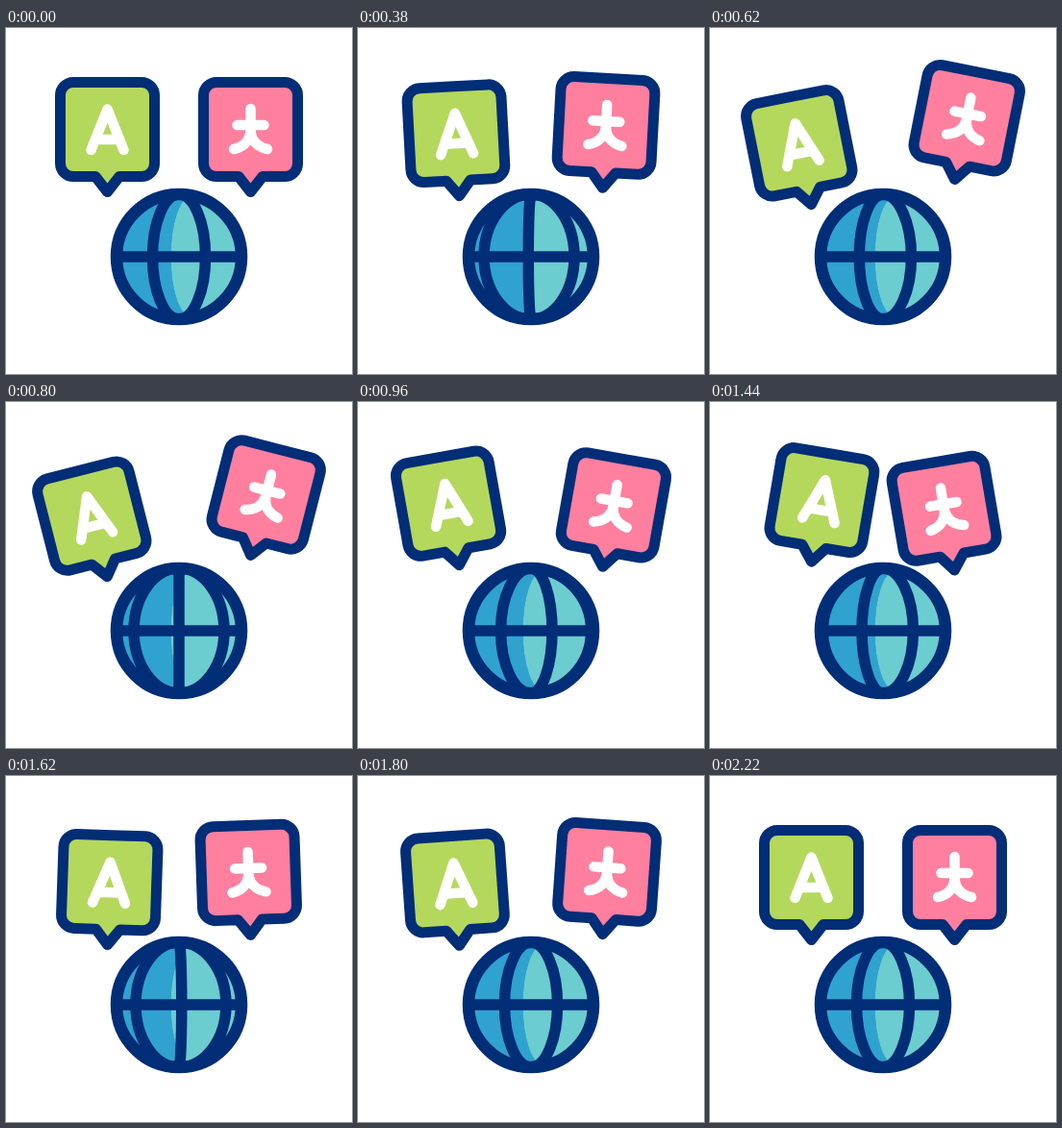
Recreate the animation shown at these times as an HTML page with a canvas. Size 360 px wide and 360 px high, loop 2400 ms.

```html
<!DOCTYPE html>
<html lang="en">
<head>
<meta charset="utf-8">
<title>Translation</title>
<style>
  html, body { margin: 0; width: 100%; height: 100%; overflow: hidden; background: #fff; }
  canvas { display: block; width: 360px; height: 360px; }
</style>
</head>
<body>
<canvas id="stage"></canvas>
<script>
const LOOP = 2400, START = 200, SPAN = 2000, STEP = 20;
const NAVY = '#022d77', BLUE = '#30a2cf', TEAL = '#6bcdd0', GREEN = '#b4d85c', PINK = '#ff7f9f';
const RAD = Math.PI / 180;

// Keys are [progress, value]
const TILT = [[0, 0], [0.3, -14.3], [0.6, 10], [0.8, -4], [1, 0]];
const LIFT = [[0, 0], [0.25, 14], [0.5, -14], [0.75, 6.5], [1, 0]];

const canvas = document.getElementById('stage');
const ctx = canvas.getContext('2d');
const dpr = window.devicePixelRatio || 1;
canvas.width = canvas.height = 360 * dpr;

const letterA = new Path2D('M-17 -44 L0 -86.5 L17 -44 M-12 -55 H12');
const glyph = new Path2D('M0 -87 V-66 C0 -53 -8 -47 -17.5 -45 M0 -66 C0 -53 8 -47 17.5 -45 M-14 -70 H14');
const box = bubblePath();

function bubblePath() {
  const p = new Path2D(), top = -114.5, low = -16.5, w = 49, r = 13.5;
  p.moveTo(0, top);
  p.arcTo(w, top, w, low, r);
  p.arcTo(w, low, 0, low, r);
  p.lineTo(12.5, low);
  p.lineTo(0, -0.5);
  p.lineTo(-12.5, low);
  p.arcTo(-w, low, -w, top, r);
  p.arcTo(-w, top, 0, top, r);
  p.closePath();
  return p;
}

function ease(keys, u) {
  let i = 1;
  while (i < keys.length - 1 && u > keys[i][0]) i++;
  const [a, from] = keys[i - 1], [b, to] = keys[i];
  const k = (u - a) / (b - a);
  return from + (to - from) * k * k * (3 - 2 * k);
}

function stroke(path, color, width) {
  ctx.strokeStyle = color;
  ctx.lineWidth = width;
  ctx.stroke(path);
}

// The origin of a bubble is the point of its tail
function bubble(x, dy, angle, fill, sign) {
  ctx.save();
  ctx.translate(x, 171 + dy);
  ctx.rotate(angle * RAD);
  ctx.fillStyle = fill;
  ctx.fill(box);
  stroke(box, NAVY, 11);
  stroke(sign, '#fff', 10.5);
  ctx.restore();
}

// Meridians move evenly between the rim and the two inner places
function meridianX(s) {
  const d = Math.abs(s);
  return Math.sign(s) * (d < 0.5 ? 55 * d : 27.5 + 39 * (d - 0.5));
}

function globe(turn) {
  ctx.save();
  ctx.translate(180, 238);
  const disc = new Path2D();
  disc.arc(0, 0, 65, 0, 2 * Math.PI);
  ctx.fillStyle = BLUE;
  ctx.fill(disc);

  ctx.fillStyle = TEAL;
  ctx.beginPath();
  ctx.arc(0, 0, 62, -Math.PI / 2, Math.PI / 2);
  ctx.lineTo(12, 62);
  ctx.ellipse(12, 0, 20.5, 62, 0, Math.PI / 2, 1.5 * Math.PI);
  ctx.save();
  ctx.clip();
  ctx.beginPath();
  ctx.ellipse(12, 0, 20.5, 62, 0, Math.PI / 2, 1.5 * Math.PI);
  ctx.lineTo(65, -62);
  ctx.lineTo(65, 62);
  ctx.fill();
  ctx.restore();

  const lines = new Path2D('M-65 0 H65');
  const phase = turn - Math.floor(turn);
  for (let i = -1.5; i < 1; i++) {
    const x = meridianX(i + phase);
    lines.moveTo(0, -65);
    lines.ellipse(0, 0, Math.abs(x), 65, 0, -Math.PI / 2, Math.PI / 2, x < 0);
  }
  ctx.save();
  ctx.clip(disc);
  stroke(lines, NAVY, 11.5);
  ctx.restore();
  stroke(disc, NAVY, 12.5);
  ctx.restore();
}

function draw(now) {
  const t = Math.floor((now % LOOP) / STEP) * STEP;
  const u = Math.min(1, Math.max(0, (t - START) / SPAN));
  const tilt = ease(TILT, u), lift = ease(LIFT, u);
  ctx.setTransform(dpr, 0, 0, dpr, 0, 0);
  ctx.fillStyle = '#fff';
  ctx.fillRect(0, 0, 360, 360);
  ctx.lineCap = ctx.lineJoin = 'round';
  globe(5 * u);
  bubble(105.5, lift, tilt, GREEN, letterA);
  bubble(254.5, -lift, -tilt, PINK, glyph);
}

let begin = null;
function tick(now) {
  if (begin === null) begin = now;
  draw(now - begin);
  requestAnimationFrame(tick);
}
draw(0);
requestAnimationFrame(tick);
</script>
</body>
</html>
```
